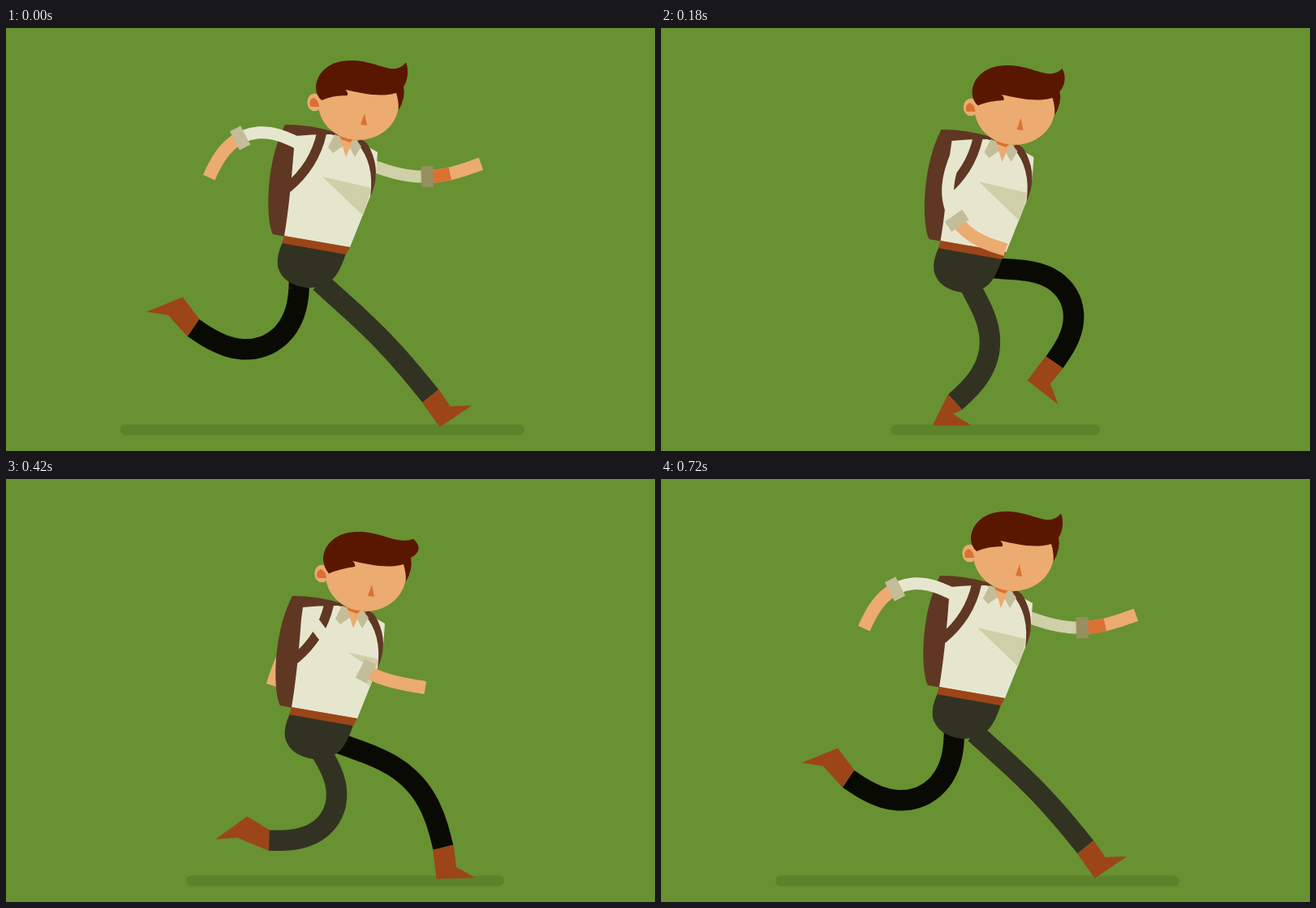
An HTML page with a canvas that plays this animation: 800 px wide and 521 px high, repeating every 0.75 s.

```html
<!DOCTYPE html>
<html lang="en">
<head>
<meta charset="utf-8">
<title>Runner</title>
<style>
  html, body { margin: 0; width: 100%; height: 100%; overflow: hidden; background: #689132; }
  canvas { display: block; width: 100vw; height: 100vh; }
</style>
</head>
<body>
<canvas id="stage" width="800" height="521"></canvas>
<script>
const ctx = document.getElementById('stage').getContext('2d');
const LOOP = 750, STEP = 30, CYCLE = 720, HALF = CYCLE / 2;
const SEGMENTS = 50;

const C = {
  ground: '#689132', shadow: '#5c822a', skin: '#ecab70', blush: '#db7033',
  hair: '#5a1700', shirt: '#e6e6cf', shade: '#cfd0a7', collar: '#c4bd9a',
  cuffFar: '#968f60', pack: '#603723', leather: '#9c4519',
  trousers: '#323222', trousersFar: '#0a0a04'
};

// Periodic monotone cubic through key poses; each row is [time, ...values].
function track(period, rows) {
  const n = rows.length;
  const time = i => rows[(i + n) % n][0] + period * Math.floor(i / n);
  const value = (i, k) => rows[(i + n) % n][k];
  const slope = (i, k) => (value(i + 1, k) - value(i, k)) / (time(i + 1) - time(i));
  const tangent = (i, k) => {
    const a = slope(i - 1, k), b = slope(i, k);
    return a * b <= 0 ? 0 : 2 * a * b / (a + b);
  };
  return t => {
    t %= period;
    let i = n - 1;
    while (rows[i][0] > t) i--;
    const h = time(i + 1) - time(i), s = (t - time(i)) / h, r = 1 - s;
    return rows[0].slice(1).map((_, j) => {
      const k = j + 1;
      return value(i, k) * r * r * (1 + 2 * s) + value(i + 1, k) * s * s * (3 - 2 * s)
        + h * s * r * (tangent(i, k) * r - tangent(i + 1, k) * s);
    });
  };
}

// body x, y, shadow left, right
const bodyAt = track(HALF, [
  [0, 0, 0, 141, 639],
  [60, 9, 25, 222, 614],
  [180, 1.5, 6, 283, 541],
  [270, 0, -14, 190, 600]
]);

// hip x, y on the body, thigh angle, shin angle, length, sole angle
const legAt = track(CYCLE, [
  [0, 387, 313, 42, 51, 196, -34],
  [60, 392, 297, 20, 76, 204, -2],
  [180, 372, 298, 62, 138, 178, 0],
  [360, 361.5, 264, 90, 214, 239, 158],
  [420, 363, 284, 59, 181, 203, 144],
  [540, 398.5, 289, 4, 125, 202, 38]
]);

// upper arm angle, forearm angle
const armAt = track(CYCLE, [
  [0, 207, 115],
  [60, 195, 97],
  [180, 112, 17],
  [360, 37, -5],
  [420, 54, 9],
  [540, 156, 78]
]);

const rad = deg => deg * Math.PI / 180;

// A limb keeps its length and turns smoothly from one angle to the other.
function limb(x, y, from, to, length, straight = 0) {
  const points = [];
  const angleAt = s => {
    const u = Math.max(0, (s - straight) / (1 - straight));
    return rad(from + (to - from) * (1 - Math.cos(Math.PI * u)) / 2);
  };
  for (let i = 0; i <= SEGMENTS; i++) {
    points.push({ x, y, angle: angleAt(i / SEGMENTS) });
    const a = angleAt((i + 0.5) / SEGMENTS);
    x += Math.cos(a) * length / SEGMENTS;
    y += Math.sin(a) * length / SEGMENTS;
  }
  return points;
}

function tube(points, from, to, width, color) {
  ctx.beginPath();
  for (const p of points.slice(from * SEGMENTS, to * SEGMENTS + 1)) ctx.lineTo(p.x, p.y);
  ctx.lineWidth = width;
  ctx.strokeStyle = color;
  ctx.stroke();
}

function fill(color, d) {
  ctx.fillStyle = color;
  ctx.fill(new Path2D(d));
}

function oval(color, x, y, rx, ry) {
  ctx.fillStyle = color;
  ctx.beginPath();
  ctx.ellipse(x, y, rx, ry, 0, 0, 2 * Math.PI);
  ctx.fill();
}

function leg(t, color) {
  const [hipX, hipY, thigh, shin, length, sole] = legAt(t);
  const points = limb(hipX, hipY, thigh, shin, length, 0.15);
  tube(points, 0, 1, 25.5, color);
  const { x, y, angle } = points[SEGMENTS];
  const ex = 13 * Math.sin(angle), ey = -13 * Math.cos(angle);
  // the heel sits behind the bisector of shin and sole
  const heel = rad((shin + sole + 90) / 2 + 20);
  const c = Math.cos(rad(sole)), s = Math.sin(rad(sole));
  const foot = (u, v) => [
    x + 40 * Math.cos(heel) + u * c - v * s,
    y + 40 * Math.sin(heel) + u * s + v * c
  ];
  const boot = [[x - ex, y - ey], [x + ex, y + ey], foot(25, -14), foot(48, 0), foot(0, 0)];
  fill(C.leather, 'M' + boot.join('L') + 'Z');
}

function arm(points, cuffAt, sleeve, cuff, shadeTo) {
  tube(points, 0, cuffAt, 15, sleeve);
  tube(points, cuffAt, 1, 16, C.skin);
  if (shadeTo) tube(points, cuffAt, shadeTo, 16, C.blush);
  const { x, y, angle } = points[Math.round(cuffAt * SEGMENTS)];
  ctx.save();
  ctx.translate(x, y);
  ctx.rotate(angle);
  ctx.fillStyle = cuff;
  ctx.fillRect(-7.5, -13, 15, 26);
  ctx.restore();
}

function nearArm(t) {
  const [upper, fore] = armAt(t);
  arm(limb(365, 144.5, upper, fore, 185 - upper / 5), 0.56, C.shirt, C.collar);
}

// Half a cycle later, with a wider swing.
function farArm(t) {
  const [a, b] = armAt(t + HALF);
  const upper = 1.15 * a - 23, fore = 1.25 * b - 14;
  arm(limb(447, 168, upper, fore, 140 + upper / 7), 0.52, C.shade, C.cuffFar, 0.72);
}

function torso() {
  fill(C.trousers, 'M341 264L419 278Q411 302 402 310Q392 320 371 320Q341 316 335 294Q333 280 341 264Z');
  fill(C.pack, 'M344 119Q375 119 405 128L414 138L358 150L345 257L329 254C320 235 320 165 344 119Z');
  fill(C.shirt, 'M357 133Q375 131 400 131L437 140Q448 148 458 153L457 167Q456 190 450 205L424 270L343 256Q350 215 355 147Z');
  fill(C.shade, 'M390 183L450 197L447 210L440 231Z');
  fill(C.pack, 'M436 137Q444 138 449 149Q456 164 456 178Q456 193 449 208Q455 166 432 141Z');
  ctx.strokeStyle = C.pack;
  ctx.lineWidth = 12;
  ctx.stroke(new Path2D('M389 130Q380 170 347 197'));
  fill(C.leather, 'M343 256L424 270L419 279L340 265Z');
  fill(C.collar, 'M405 131L397 147L403 154L416 145L413 134ZM428 137L423 146L430 159L438 146L432 138Z');
  fill(C.skin, 'M411 133L419 159L428 138Z');
  fill(C.blush, 'M411 133L428 137L424 141L413 137Z');
}

// The tuft and fringe sink as the body drops.
function head(drop) {
  const tipY = 42.5 + drop / 4, bulge = 495 + drop / 4, fringe = 89 + drop / 10;
  oval(C.skin, 380.5, 91.5, 9.2, 10.8);
  oval(C.skin, 434.5, 93, 49.5, 45);
  fill(C.blush, 'M375 97Q372 89 379 86Q385 88 386 97Z');
  fill(C.blush, 'M442 105L437 119L445 120Z');
  fill(C.hair, `M389 ${fringe}Q382 83 382 73C383 54 400 40 424 40C448 40 460 48 474 50
    Q485 52 493 ${tipY}C${bulge + 2} ${tipY + 9} ${bulge} 66 490 72
    Q493 86 484 101Q484 89 481 80C460 86 438 80 418 76Q422 79 421 83Q402 ${fringe - 6} 389 ${fringe}Z`);
}

function draw(t) {
  const [x, y, left, right] = bodyAt(t);
  ctx.fillStyle = C.ground;
  ctx.fillRect(0, 0, 800, 521);
  ctx.fillStyle = C.shadow;
  ctx.beginPath();
  ctx.roundRect(left, 488.5, right - left, 13, 6.5);
  ctx.fill();

  ctx.save();
  ctx.translate(x, y);
  farArm(t);
  leg(t + HALF, C.trousersFar);
  leg(t, C.trousers);
  torso();
  head(y);
  nearArm(t);
  ctx.restore();
}

function tick() {
  const t = performance.now() % LOOP;
  draw(Math.floor(t / STEP) * STEP);
  requestAnimationFrame(tick);
}
tick();
</script>
</body>
</html>
```
